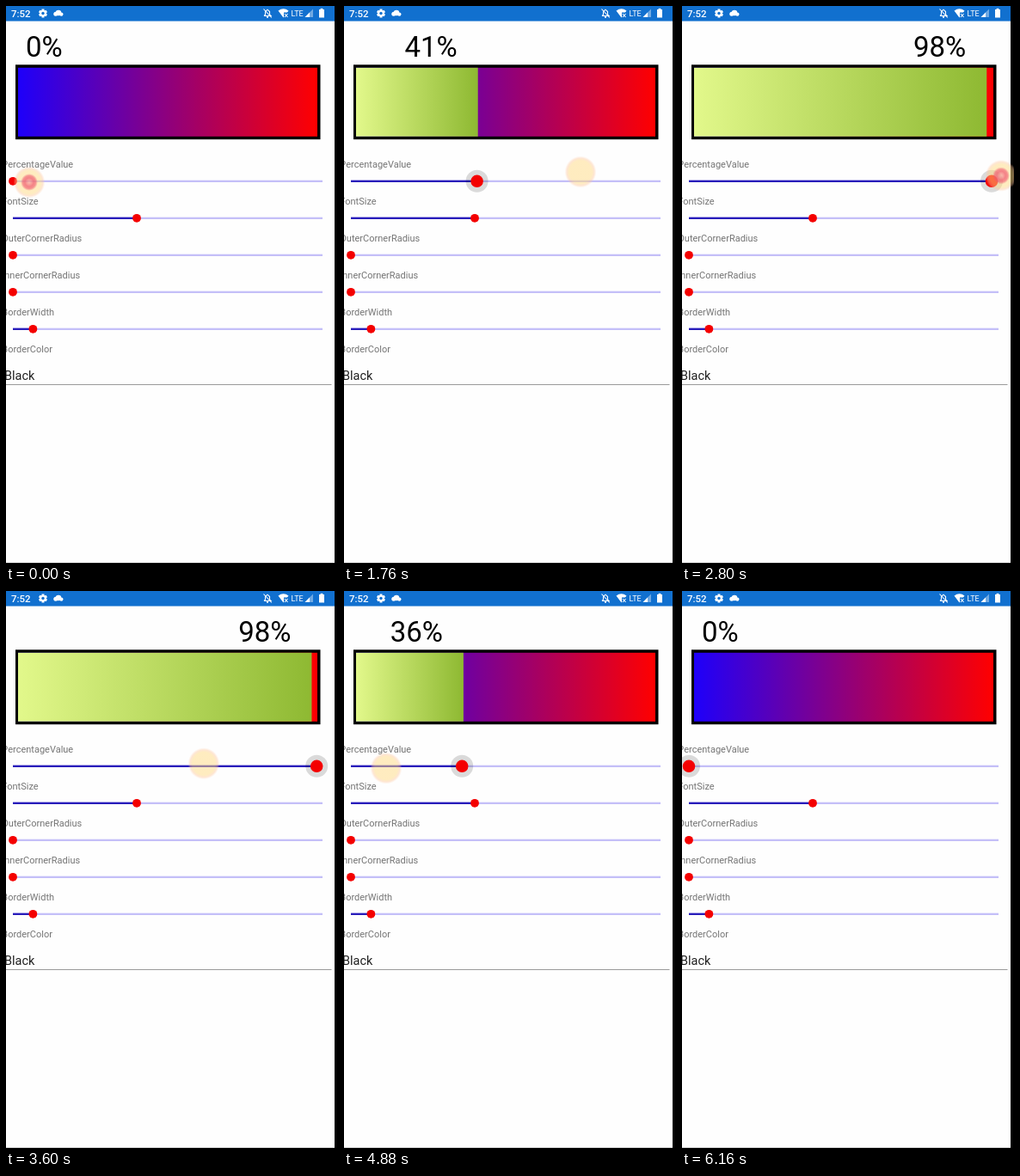
Write an HTML page with a canvas that moves like this. It is 386 px wide and 648 px high and loops after 6240 ms.

```html
<!DOCTYPE html>
<html lang="en">
<head>
<meta charset="utf-8">
<title>Progress bar demo</title>
<style>
  html, body { margin: 0; width: 100%; height: 100%; overflow: hidden; background: #fff; }
  canvas { display: block; width: 386px; height: 648px; }
</style>
</head>
<body>
<canvas id="stage"></canvas>
<script>
const W = 386, H = 648, LOOP = 6240, STEP = 80;
const LAG = 640;                 // the slider trails the finger
const TRACK = { left: 8, width: 360 };
const canvas = document.getElementById('stage');
const ratio = window.devicePixelRatio || 1;
canvas.width = W * ratio;
canvas.height = H * ratio;
const ctx = canvas.getContext('2d');
ctx.scale(ratio, ratio);

const clamp = (v, lo, hi) => Math.min(hi, Math.max(lo, v));

// Smooth monotone curve through [time, value] points.
function curve(points) {
  const last = points.length - 1;
  const slope = i => (points[i + 1][1] - points[i][1]) / (points[i + 1][0] - points[i][0]);
  const tangent = points.map((p, i) => {
    if (i === 0 || i === last) return slope(i ? last - 1 : 0);
    const a = slope(i - 1), b = slope(i);
    return a * b <= 0 ? 0 : 2 * a * b / (a + b);
  });
  return time => {
    const t = clamp(time, points[0][0], points[last][0]);
    let i = 0;
    while (i < last - 1 && t > points[i + 1][0]) i++;
    const [t0, v0] = points[i], [t1, v1] = points[i + 1];
    const d = t1 - t0, u = (t - t0) / d, r = 1 - u;
    return v0 * (1 + 2 * u) * r * r + tangent[i] * d * u * r * r
         + v1 * u * u * (3 - 2 * u) - tangent[i + 1] * d * u * u * r;
  };
}

// One sweep of the finger: right, a rest at the end, and back.
const fingerX = curve([[0, 27], [400, 54.6], [1120, 154.6], [1760, 275], [2160, 360],
  [2800, 371], [3680, 216], [4320, 126], [4800, 57], [5440, 4]]);
const fingerY = t => t < 1760 ? 193 + 12 * (1 - t / 1760) ** 2 : 193 + (t - 1760) * 0.0042;
const fingerAlpha = t => clamp((5680 - t) / 280, 0, 1);
const restGlow = t => Math.max(0, ...[0, 2800, 5440].map(rest => 1 - Math.abs(t - rest) / 280));

const progress = t =>
  t < LAG ? 0 : clamp((fingerX(t - LAG) - TRACK.left) / TRACK.width, 0, 1) * (t < 6080);

function rect(x, y, w, h, color) {
  ctx.fillStyle = color;
  ctx.fillRect(x, y, w, h);
}

function disc(x, y, r, color) {
  ctx.fillStyle = color;
  ctx.beginPath();
  ctx.arc(x, y, r, 0, Math.PI * 2);
  ctx.fill();
}

function path(points, width, color) {
  ctx.beginPath();
  points.forEach(([x, y]) => ctx.lineTo(x, y));
  ctx.strokeStyle = ctx.fillStyle = color;
  ctx.lineWidth = width;
  if (width) ctx.stroke();
  else ctx.fill();
}

function text(str, x, y, size, color, weight = 400) {
  ctx.font = `${weight} ${size}px Roboto, sans-serif`;
  ctx.fillStyle = color;
  ctx.fillText(str, x, y);
}

function blend(g, ...stops) {
  stops.forEach(([at, color]) => g.addColorStop(at, color));
  return g;
}

const across = (x0, x1, from, to) =>
  blend(ctx.createLinearGradient(x0, 0, x1, 0), [0, from], [1, to]);

function statusBar() {
  const blue = '#1170cf', white = '#fff';
  rect(0, 0, 382, 17.6, blue);
  text('7:52', 6, 13, 11.5, white, 500);

  // gear
  for (let i = 0; i < 3; i++) {
    const a = i * Math.PI / 3 + Math.PI / 6, c = Math.cos(a) * 5, s = Math.sin(a) * 5;
    path([[43 - c, 8.5 - s], [43 + c, 8.5 + s]], 3, white);
  }
  disc(43, 8.5, 3.8, white);
  disc(43, 8.5, 1.7, blue);

  // cloud
  disc(57.8, 9.3, 2.5, white);
  disc(61, 8, 3.3, white);
  disc(64.3, 9.6, 2.2, white);

  // muted bell
  path([[300, 11.5], [301.5, 10], [301.5, 6.5], [304, 4.2], [306.5, 6.5], [306.5, 10], [308, 11.5], [300, 11.5]], 1.1, white);
  disc(304, 13, 1.1, white);
  path([[299.5, 3.5], [308.8, 13.5]], 1.1, white);

  // wifi without connection
  ctx.fillStyle = white;
  ctx.beginPath();
  ctx.moveTo(322.5, 13.5);
  ctx.lineTo(316.5, 5.5);
  ctx.quadraticCurveTo(322.5, 1.2, 328.5, 5.5);
  ctx.fill();
  rect(323, 7.5, 6, 7, blue);
  path([[324, 9], [327.5, 13]], 1.1, white);
  path([[327.5, 9], [324, 13]], 1.1, white);

  text('LTE', 331.5, 12.3, 9, white);
  path([[347.5, 13], [357, 13], [357, 3.5]], 0, 'rgba(255,255,255,.4)');
  path([[347.5, 13], [353, 13], [353, 7.5]], 0, white);
  rect(364, 4, 6, 9.5, white);
  rect(365.6, 2.8, 2.8, 1.4, white);
}

function progressBar(p) {
  const left = 14, top = 71.8, width = 348, height = 80, edge = left + width * p;
  rect(11, 68.3, 354.5, 86.9, '#000');
  rect(left, top, width, height, across(left, left + width, 'rgb(30,0,250)', 'rgb(255,0,0)'));
  if (p > 0) rect(left, top, edge - left, height, across(left, edge, '#e2f88b', '#8eb932'));

  const label = Math.round(p * 100) + '%', size = 33;
  ctx.font = `400 ${size}px Roboto, sans-serif`;
  const x = Math.max(23, edge - 24 - ctx.measureText(label).width);
  text(label, x, 59, size, '#000');
}

function slider(label, y, value, pressed) {
  const { left, width } = TRACK, x = left + width * value;
  text(label, -4.7, y - 16, 11, '#757575');
  rect(left, y - 1.3, width, 2.3, '#c4bff8');
  rect(left, y - 1.3, x - left, 2.3, '#281cba');
  if (pressed) disc(x, y - 0.2, 13, 'rgba(0,0,0,.14)');
  disc(x, y - 0.2, pressed ? 7.3 : 4.9, '#f40000');
}

function finger(t) {
  const x = fingerX(t), y = fingerY(t), r = 18.5;
  ctx.save();
  ctx.globalAlpha = fingerAlpha(t);
  disc(x, y, r, blend(ctx.createRadialGradient(x, y, 0, x, y, r),
    [0, 'rgba(255,218,130,.5)'], [0.72, 'rgba(255,218,130,.5)'],
    [0.86, 'rgba(255,196,150,.42)'], [1, 'rgba(255,205,170,0)']));
  ctx.globalAlpha *= restGlow(t);
  disc(x, y, 10, blend(ctx.createRadialGradient(x, y, 0, x, y, 10),
    [0, 'rgba(245,130,150,.45)'], [0.5, 'rgba(240,85,110,.7)'],
    [0.75, 'rgba(240,85,110,.6)'], [1, 'rgba(240,85,110,0)']));
  ctx.restore();
}

function draw(now) {
  const t = Math.floor((now % LOOP) / STEP) * STEP;
  const p = progress(t);

  rect(0, 0, W, H, '#000');
  rect(0, 0, 382, H, '#fefefe');
  statusBar();
  progressBar(p);

  const values = { PercentageValue: p, FontSize: 0.4, OuterCornerRadius: 0, InnerCornerRadius: 0, BorderWidth: 0.065 };
  Object.entries(values).forEach(([name, value], i) => slider(name, 204 + 43 * i, value, i === 0 && t >= LAG));

  text('BorderColor', -4.7, 403, 11, '#757575');
  text('Black', -2, 435, 14.5, '#212121');
  rect(0, 440, 378.5, 1, '#9a9a9a');
  rect(0, 647, 382, 1, '#cfcfcf');
  finger(t);
}

const start = performance.now();
function tick() {
  draw(performance.now() - start);
  requestAnimationFrame(tick);
}
tick();
</script>
</body>
</html>
```
